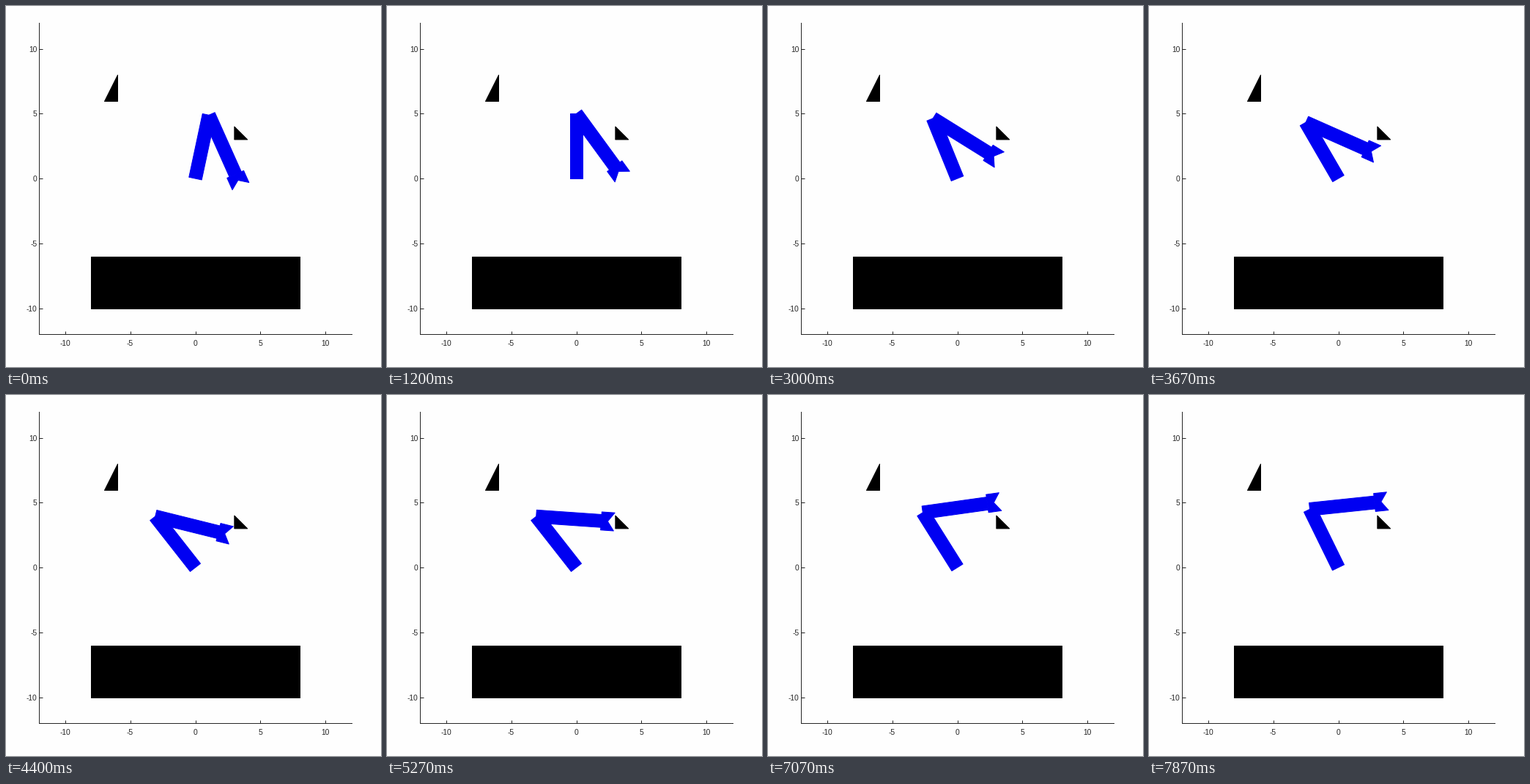
A matplotlib script that plays this animation: 512 px wide and 494 px high, repeating every 8000 ms.

```python
import numpy as np
import matplotlib.pyplot as plt
from matplotlib.animation import FuncAnimation
from matplotlib.patches import Polygon

plt.rcParams["font.family"] = "Liberation Sans"
plt.rcParams["axes.unicode_minus"] = False

W, H, DPI = 512, 494, 100
PX = 72 / DPI                 # one pixel in points
LOOP, FRAMES = 8000, 120
INK, BLUE, PAPER = "#262626", "#0000f2", "#fefefe"

# Arm parts as complex outlines, pointing along the real axis.
LENGTH = 5
LINK = np.array([-0.5j, LENGTH - 0.5j, LENGTH + 0.5j, 0.5j])
HAND = LENGTH + np.array([-0.7j, 1 - 0.7j, 0.5, 1 + 0.7j, 0.7j])

# Joint angles between key poses, in whole steps of STEP degrees.
STEP = 2
MOVES = 48
KEY_MOVES = [0, 25, 38, MOVES]
SHOULDER = [78, 128, 128, 116]
ELBOW = [-144, -144, -118, -110]

# The frame at which each move happens; the pace quickens after ten moves.
MOVE_FRAMES = np.floor(np.interp(range(MOVES), [0, 10, MOVES - 1], [4, 31, 118]))

fig = plt.figure(figsize=(W / DPI, H / DPI), dpi=DPI, facecolor=PAPER)
ax = fig.add_axes([45 / W, 44.9 / H, 427 / W, 426 / H], facecolor=PAPER)
ax.set(xlim=(-12, 12), ylim=(-12, 12),
       xticks=range(-10, 11, 5), yticks=range(-10, 11, 5))
ax.spines[["top", "right"]].set_visible(False)
for side in ("left", "bottom"):
    ax.spines[side].set(color=INK, linewidth=PX)
ax.tick_params(direction="in", length=4.5 * PX, width=PX, color=INK,
               labelcolor=INK, labelsize=10.3 * PX)
ax.tick_params(axis="x", pad=7.4 * PX)
ax.tick_params(axis="y", pad=2.6 * PX)


def add_shape(points, color):
    patch = Polygon(points, closed=True, facecolor=color, edgecolor=color,
                    linewidth=PX, joinstyle="round", zorder=3)
    return ax.add_patch(patch)


def to_xy(z):
    return np.column_stack([z.real, z.imag])


def angle_at(move, keys):
    degrees = STEP * np.round(np.interp(move, KEY_MOVES, keys) / STEP)
    return np.radians(degrees)


add_shape([(-8, -10), (8, -10), (8, -6), (-8, -6)], "black")
add_shape([(-7, 6), (-6, 6), (-6, 8)], "black")
add_shape([(3, 3), (4, 3), (3, 4)], "black")
upper, lower, hand = (add_shape(to_xy(s), BLUE) for s in (LINK, LINK, HAND))


def draw(frame):
    move = np.searchsorted(MOVE_FRAMES, frame, side="right")
    shoulder = angle_at(move, SHOULDER)
    turn1 = np.exp(1j * shoulder)
    turn2 = np.exp(1j * (shoulder + angle_at(move, ELBOW)))
    joint = LENGTH * turn1
    upper.set_xy(to_xy(LINK * turn1))
    lower.set_xy(to_xy(joint + LINK * turn2))
    hand.set_xy(to_xy(joint + HAND * turn2))
    return upper, lower, hand


anim = FuncAnimation(fig, draw, frames=FRAMES, interval=LOOP / FRAMES,
                     repeat=True, repeat_delay=0, blit=False)
plt.show()
```
